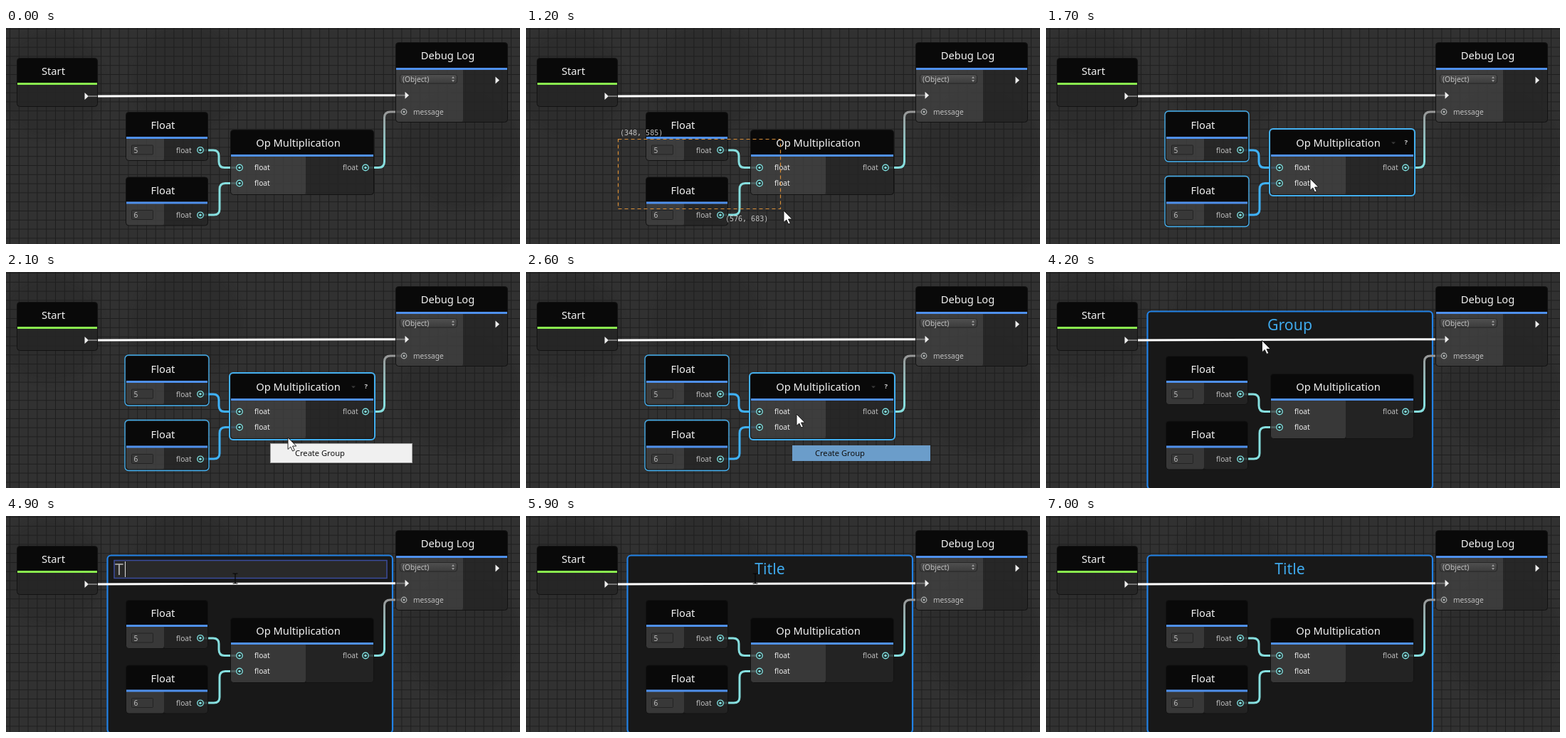
Recreate the animation shown at these times as an HTML page. Size 722 by 304 pixels, loop 7200 ms.

```html
<!DOCTYPE html>
<html lang="en">
<head>
<meta charset="utf-8">
<title>Node graph</title>
<style>
html, body { margin: 0; width: 100%; height: 100%; overflow: hidden; background: #303030; }
svg { display: block; width: 722px; height: 304px; font-family: "Noto Sans", sans-serif; }
text { white-space: pre; }
.title { font-size: 14.7px; fill: #f2f2f2; text-anchor: middle; }
.label { font-size: 10.2px; fill: #c0c0c0; }
.bright { fill: #f0f0f0; }
.coord { font: 10px "DejaVu Sans Mono", monospace; fill: #c4c4c4; }
.big { font-size: 21.3px; }
.wire { fill: none; stroke: #86dfdf; stroke-width: 3; }
.stub { stroke: #777; stroke-width: 2; }
.port { fill: #202626; stroke-width: 1.4; }
.halo { fill: none; stroke: #43b0f0; visibility: hidden; }
.selected .halo { visibility: visible; }
.selected .link { stroke: #3fb2fa; }
</style>
</head>
<body>
<svg id="stage" viewBox="0 0 722 304">
  <defs>
    <pattern id="grid" x="5" y="1" width="12.8" height="12.8" patternUnits="userSpaceOnUse">
      <path d="M.5 0V12.8M0 .5H12.8" stroke="#1e1e1e"/>
    </pattern>
    <linearGradient id="fade" gradientUnits="userSpaceOnUse" x1="0" y1="196" x2="0" y2="118">
      <stop offset=".1" stop-color="#86dfdf"/><stop offset="1" stop-color="#999"/>
    </linearGradient>
    <linearGradient id="popup" x2="0" y2="1">
      <stop stop-color="#505050"/><stop offset="1" stop-color="#3c3c3c"/>
    </linearGradient>
    <filter id="soft"><feGaussianBlur stdDeviation="5"/></filter>
  </defs>
  <rect width="722" height="304" fill="#313131"/>
  <g fill="#222" opacity=".22" filter="url(#soft)">
    <circle cx="62" cy="80" r="74"/><circle cx="255" cy="70" r="76"/><circle cx="640" cy="170" r="84"/>
  </g>
  <rect width="722" height="304" fill="url(#grid)"/>

  <g id="group">
    <rect id="frame" rx="5"/>
    <g id="field">
      <rect x="152" y="62.5" width="383" height="25" fill="#292929" stroke="#3b4c9c" stroke-width="1.5"/>
      <rect id="mark" x="153" y="64" width="64" height="22" fill="#3d5f96"/>
      <path id="caret" d="M0 64V86" stroke="#ddd"/>
    </g>
    <text id="name" class="big"></text>
  </g>

  <g id="graph">
    <path d="M129 96L547 94.7" stroke="#fff" stroke-width="3"/>
    <path class="wire link" d="M277 172H291Q299 172 299 180V188Q299 196.5 307 196.5H324"/>
    <path class="wire link" d="M277 263H292Q300 263 300 255V227Q300 218.5 308 218.5H324"/>
    <path class="wire" style="stroke:url(#fade)" d="M509 196.5H523Q531.5 196.5 531.5 188V126Q531.5 118 540 118H555"/>
    <g id="nodes"></g>
    <g id="hover">
      <path d="M485 160.5H491L488 163.5Z" fill="#3a3a3a"/>
      <text x="503.5" y="164" font-size="9.5" font-weight="600" fill="#ccc">?</text>
    </g>
  </g>

  <g id="menu">
    <rect id="panel" x="371.5" y="241.5" width="199" height="27" fill="#f0f0f0" stroke="#a0a0a0"/>
    <rect id="choice" x="374" y="244" width="194" height="22" fill="#6b9dca"/>
    <text x="406" y="259" font-size="11.1" fill="#111">Create Group</text>
  </g>

  <g id="marquee">
    <rect id="box" fill="none" stroke="#d98e36" stroke-width="1.2" stroke-dasharray="5 4"/>
    <text id="from" class="coord"></text>
    <text id="to" class="coord"></text>
  </g>

  <path id="arrow" d="M0 0V16.5L3.8 13 6.6 19 9.3 17.8 6.5 12H11.8Z" fill="#fff" stroke="#111" stroke-width=".9"/>
  <path id="beam" d="M-3.5 -7H-1L0 -6 1 -7H3.5M0 -6V6M-3.5 7H-1L0 6 1 7H3.5" fill="none" stroke="#050505" stroke-width="1.2"/>
</svg>
<script>
const $ = id => document.getElementById(id);
const LOOP = 7200, STEP = 100;

const label = (x, y, text, cls = "") => `<text class="label ${cls}" x="${x}" y="${y}">${text}</text>`;
const port = (x, y, color = "#7fdcdc", r = 4.2) =>
  `<circle class="port" cx="${x}" cy="${y}" r="${r}" stroke="${color}"/><circle cx="${x}" cy="${y}" r="1.8" fill="${color}"/>`;
const flow = (x, y) => `<path d="M${x} ${y - 5}L${x + 5.5} ${y}L${x} ${y + 5}Z" fill="#eee"/>`;

function node({ x, y, w, h, head, split, title, color = "#4f90ec", halo = 0, inner }) {
  const top = y + head, body = h - head;
  return `<g>
    <rect x="${x}" y="${top}" width="${split}" height="${body}" rx="4" fill="#404040" fill-opacity=".82"/>
    <rect x="${x + split}" y="${top}" width="${w - split}" height="${body}" rx="3" fill="#262626" fill-opacity=".84"/>
    <path d="M${x} ${top}V${y + 4}q0 -4 4 -4H${x + w - 4}q4 0 4 4V${top}Z" fill="#090909"/>
    <rect x="${x}" y="${top}" width="${w}" height="3" fill="${color}"/>
    <rect x="${x}" y="${y}" width="${w}" height="${h}" rx="4" fill="none" stroke="#121212"/>
    <rect class="halo" x="${x - 1.5}" y="${y - 1.5}" width="${w + 3}" height="${h + 3}" rx="5" stroke-width="${halo}"/>
    <text class="title" x="${x + w / 2 - 5.5}" y="${y + 23.7}">${title}</text>${inner}</g>`;
}

const floatNode = (y, value) => node({
  x: 168.5, y, w: 115, h: 68, head: 34.5, split: 53.5, title: "Float", halo: 1.3,
  inner: `<rect x="176.5" y="${y + 46.5}" width="30" height="13" rx="1" fill="#383838" stroke="#232323"/>
    ${label(179.5, y + 57, value)}${label(239, y + 57, "float")}${port(273, y + 53.3)}`
});

$("nodes").innerHTML = [
  node({
    x: 15.5, y: 42.5, w: 113, h: 68, head: 34.5, split: 0, title: "Start", color: "#8af04f",
    inner: `<path class="stub" d="M116 96H128"/>${flow(110.5, 96)}`
  }),
  floatNode(118.5, "5"),
  floatNode(210, "6"),
  node({
    x: 315.5, y: 143.5, w: 201, h: 91, head: 34.5, split: 105.5, title: "Op Multiplication", halo: 2,
    inner: port(328, 196.5) + port(328, 218.5) + port(505, 196.5) +
      label(349, 200, "float", "bright") + label(349, 222, "float", "bright") + label(473, 200, "float")
  }),
  node({
    x: 547.5, y: 20.5, w: 157, h: 112, head: 35.5, split: 94.5, title: "Debug Log",
    inner: `<path class="stub" d="M548 94.7H561"/>${flow(560.5, 94.7)}${flow(687.5, 73.5)}
      <rect x="553.5" y="65.5" width="80" height="12.5" rx="3" fill="url(#popup)" stroke="#272727"/>
      <path d="M626 71L628 68L630 71ZM626 73L628 76L630 73Z" fill="#999"/>
      ${label(557, 75.5, "(Object)")}${port(559, 118, "#aaa", 3.7)}${label(572, 121.5, "message")}`
  })
].join("");

// time, x, y
const path = [
  [100, 40, 290], [700, 134, 159], [800, 134, 159], [1200, 362, 257], [1300, 362, 257],
  [1700, 371, 212], [1900, 372, 212], [2300, 420, 254], [2500, 420, 254], [2600, 380, 200],
  [3200, 300, 98], [4100, 300, 98], [4500, 322, 88], [LOOP, 322, 88]
];
const typed = [[4700, "Group"], [4900, "T"], [5100, "Ti"], [5300, "Tit"], [5400, "Titl"], [5600, "Title"]];

const clamp = v => Math.min(1, Math.max(0, v));
const ease = v => v * v * (3 - 2 * v);

function pointer(t) {
  const i = Math.max(1, path.findIndex(p => p[0] >= t));
  const [t0, x0, y0] = path[i - 1], [t1, x1, y1] = path[i];
  const k = ease(clamp((t - t0) / (t1 - t0)));
  return [x0 + (x1 - x0) * k, y0 + (y1 - y0) * k];
}

function set(id, attrs) {
  for (const key in attrs) $(id).setAttribute(key, attrs[key]);
}
const show = (id, on) => { $(id).style.display = on ? "" : "none"; };

function drawMarquee(on, x, y) {
  show("marquee", on);
  if (!on) return;
  const left = 130, top = 156, right = Math.round(x - 4), bottom = Math.round(y - 3);
  set("box", { x: left - .5, y: top + .5, width: Math.max(0, right - left), height: Math.max(0, bottom - top) });
  set("from", { x: left + 2, y: top - 5 });
  set("to", { x: right - 78, y: bottom + 18 });
  $("from").textContent = `(${left + 218}, ${top + 429})`;
  $("to").textContent = `(${right + 218}, ${bottom + 429})`;
}

function drawGroup(t) {
  show("group", t >= 3300);
  if (t < 3300) return;
  const small = t < 3700, active = t >= 4200, editing = t >= 4700 && t < 5900;
  $("group").style.opacity = small ? clamp((t - 3100) / 500) : 1;
  set("frame", small
    ? { x: 372, y: 212.5, width: 88, height: 84 }
    : { x: 142.5, y: 55.5, width: 400.5, height: 250 });
  set("frame", {
    fill: "#181818", stroke: active ? "#2282e6" : "#0c0c0c", "stroke-width": active ? 2.2 : 1.5
  });
  show("field", editing);
  const entry = typed.filter(e => e[0] <= t).pop();
  $("name").textContent = editing ? entry[1] : t < 4700 ? "Group" : "Title";
  set("name", {
    x: editing ? 153 : small ? 416.5 : 342.5,
    y: small ? 240.5 : editing ? 83 : 82,
    "text-anchor": editing ? "start" : "middle",
    fill: editing ? "#a9a9a9" : active ? "#3fa9ec" : "#b4b4b4"
  });
  if (!editing) return;
  show("mark", t < 4900);
  const end = 155.5 + $("name").getComputedTextLength();
  set("caret", { transform: `translate(${Math.round(end) + .5} 0)` });
}

function render(now) {
  const t = Math.floor(now % LOOP / STEP) * STEP;
  const [x, y] = pointer(t);
  const place = { transform: `translate(${x} ${y})` };
  drawMarquee(t >= 800 && t < 1400, x, y);
  drawGroup(t);
  $("graph").classList.toggle("selected", t >= 1400 && t < 3300);
  show("hover", t >= 1600 && t < 2800);
  show("menu", t >= 1900 && t < 2800);
  show("panel", t < 2600);
  show("choice", t >= 2200);
  $("menu").style.opacity = t < 2700 ? 1 : .5;
  set("arrow", place);
  set("beam", place);
  show("arrow", t >= 100 && t < 4700);
  show("beam", t >= 4700 && t < 6000);
}

function tick() {
  render(performance.now());
  requestAnimationFrame(tick);
}
tick();
</script>
</body>
</html>
```
